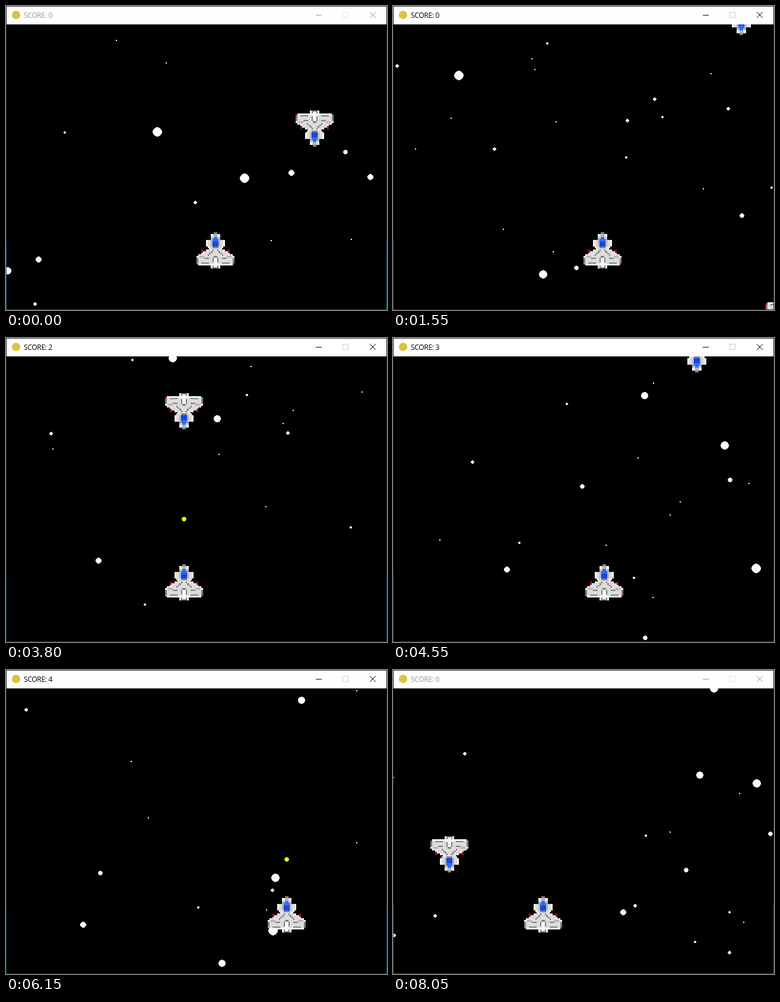
An HTML page with a canvas for the animation above (8.15 s loop, 642 px wide and 512 px high).

```html
<!DOCTYPE html>
<html>
<head>
<meta charset="utf-8">
<style>
  html, body { margin: 0; width: 642px; height: 512px; overflow: hidden; background: #000; }
  canvas { position: absolute; left: 0; top: 0; }
  #title { position: absolute; left: 30px; top: 8px; font: 12px/16px "Open Sans", "Noto Sans", sans-serif; letter-spacing: -.3px; white-space: pre; }
</style>
</head>
<body>
<canvas id="stage" width="642" height="512"></canvas>
<div id="title">SCORE: 0</div>
<script>
const LOOP = 8150, CRASH = 7100;
const SPEED = .205;       // px per ms of the slowest things
const SHOT_SPEED = .8;
const GUN_Y = 381;
const ctx = document.getElementById('stage').getContext('2d');
const title = document.getElementById('title');

// Piecewise linear value of [position, value] knots
function at(knots, t) {
  let i = 0;
  while (i < knots.length - 2 && t >= knots[i + 1][0]) i++;
  const [a, p] = knots[i], [b, q] = knots[i + 1];
  return p + (q - p) * (t - a) / (b - a);
}

function box(color, x, y, w, h) {
  ctx.fillStyle = color;
  ctx.fillRect(x, y, w, h);
}

function disc(color, x, y, r) {
  for (let d = -r; d < r; d++) {
    const half = Math.round(Math.sqrt((r - .25) ** 2 - (d + .5) ** 2));
    box(color, x - half, y + d, 2 * half, 1);
  }
}

// Each size of star enters at the same rate and falls at a speed set by its size
let seed = 7;
const random = () => (seed = seed * 16807 % 2147483647) / 2147483647;
const stars = [];
for (let r = 1; r <= 8; r++) {
  const crossing = 480 / r / SPEED;
  for (let n = Math.round((LOOP + crossing) / 400); n > 0; n--)
    stars.push({ r, x: Math.floor(1 + random() * 640), born: random() * (LOOP + crossing) - crossing });
}

// The ship is pixel art on a grid of 24 cells, mirrored about its middle
const CELLS = 24;
const px = c => Math.round(c * 64 / CELLS);
const outline = [[0, 1], [1, 3], [4, 3], [5, 6], [8, 6], [10, 4], [14, 11], [15, 12], [19, 12], [20, 11], [21, 3], [24, 2]];

function cells(color, x, y, w, h) {
  const left = px(x), width = px(x + w) - left, top = px(y), height = px(y + h) - top;
  box(color, left, top, width, height);
  box(color, -left - width, top, width, height);
}

function drawShip(x, y, turned) {
  const dark = '#808080', mid = '#b4b4b4', light = '#dcdcdc', white = '#f8f8f8';
  ctx.save();
  ctx.translate(Math.round(x), Math.round(y));
  if (turned) ctx.scale(-1, -1);
  ctx.translate(0, -31);
  for (let row = 0; row < 23; row++) {
    const half = Math.round(at(outline, row));
    cells(white, 0, row, half, 1);
    if (row < 20) cells(light, 0, row, half - 1, 1);
  }
  // Nose and cockpit
  cells(dark, 0, 0, 1, 1);
  cells(mid, 0, 1, 1, 2);
  cells(mid, 2, 3, 1, 6);
  cells('#2c6cff', 0, 3, 1, 1);
  cells('#2c6cff', 0, 4, 2, 2);
  cells('#1646dc', 0, 6, 2, 3);
  cells(dark, 0, 9, 2, 1);
  // Wings
  for (let i = 0; i < 4; i++) cells(dark, 1 + i, 11 + i, 1, 1);
  cells(dark, 4, 16, 3, 1);
  cells(dark, 4, 19, 5, 1);
  cells(mid, 7, 15, 3, 1);
  cells(dark, 11, 16, 1, 3);
  cells('#a00c24', 8, 11, 1, 2);
  // Engine
  cells(dark, 0, 15, 1, 1);
  cells(dark, 1, 16, 1, 3);
  cells(white, 0, 16, 1, 4);
  cells(dark, 1, 21, 1, 1);
  cells(dark, 0, 22, 2, 1);
  box('#20d060', -32, 51, 3, 3);
  box('#e02848', 29, 51, 3, 3);
  ctx.restore();
}

// Where each enemy is at time t, its sideways drift, and the moment it goes
const enemies = [
  { t: 0, x: 520, y: 206, drift: .09, end: 1750 },
  { t: 1550, x: 587, y: 18, drift: -.196, end: 2300, hit: true },
  { t: 2950, x: 113, y: 203, drift: .2, end: 3300, hit: true },
  { t: 3200, x: 300, y: 0, drift: 0, end: 3950, hit: true },
  { t: 4550, x: 512, y: 27, drift: -.026, end: 6050, hit: true },
  { t: 6150, x: 430, y: -32, drift: .03, end: CRASH, fast: true },
  { t: 8050, x: 95, y: 310, drift: 0, end: LOOP, fast: true }
];
const place = (e, t) => ({
  x: e.x + e.drift * (t - e.t),
  y: e.y + SPEED * (e.fast ? 2 : 1) * (t - e.t)
});

// Every hit was fired from straight below; one more shot flies past
const shots = enemies.filter(e => e.hit).map(e => {
  const { x, y } = place(e, e.end);
  return { x: Math.round(x), start: e.end - (GUN_Y - y - 31) / SHOT_SPEED, end: e.end };
});
shots.push({ x: 473, start: 6072, end: 6600 });

const player = [[0, 353], [1700, 353], [2050, 434], [2300, 434], [2950, 242], [3150, 183], [3300, 183], [3650, 300],
  [3950, 300], [4300, 356], [4700, 356], [5100, 473], [CRASH, 473], [CRASH, 353], [7500, 353], [8050, 253], [LOOP, 235]];

function drawWindow(active, score) {
  const ink = active ? '#000' : '#999';
  const glow = active ? '#0a4054' : '#0c5c94';
  box('#fff', 1, 1, 640, 30);
  box('#2b2b2b', 0, 0, 642, 1);
  for (const x of [0, 641]) {
    box('#20242c', x, 0, 1, 395);
    box(glow, x, 395, 1, 117);
  }
  box(glow, 0, 511, 642, 1);
  ctx.fillStyle = '#d8c440';
  ctx.beginPath();
  ctx.arc(17, 15, 7, 0, 7);
  ctx.fill();
  box(ink, 522, 15, 10, 1);
  ctx.strokeStyle = active ? '#ccc' : '#e6e6e6';
  ctx.strokeRect(567.5, 10.5, 9, 9);
  ctx.strokeStyle = ink;
  ctx.beginPath();
  ctx.moveTo(613, 10); ctx.lineTo(623, 20);
  ctx.moveTo(623, 10); ctx.lineTo(613, 20);
  ctx.stroke();
  title.textContent = 'SCORE: ' + score;
  title.style.color = ink;
}

function draw(now) {
  const t = Math.floor(now % LOOP / 50) * 50;
  box('#000', 0, 0, 642, 512);
  ctx.save();
  ctx.beginPath();
  ctx.rect(1, 31, 640, 480);
  ctx.clip();
  for (const s of stars) {
    const y = Math.round(31 + s.r * SPEED * (t - s.born));
    if (y > 31 - s.r && y < 511 + s.r) disc('#fff', s.x, y, s.r);
  }
  for (const s of shots)
    if (t >= s.start && t < s.end) disc('#ff0', s.x, Math.round(GUN_Y - SHOT_SPEED * (t - s.start)), 4);
  for (const e of enemies) {
    const { x, y } = place(e, t);
    if (t < e.end && y > -32) drawShip(x, y, true);
  }
  drawShip(at(player, t), 412, false);
  ctx.restore();
  const score = t < CRASH ? enemies.filter(e => e.hit && t >= e.end).length : 0;
  drawWindow(t >= 300 && t < 7900, score);
  requestAnimationFrame(() => draw(performance.now() - began));
}
const began = performance.now();
draw(0);
</script>
</body>
</html>
```
